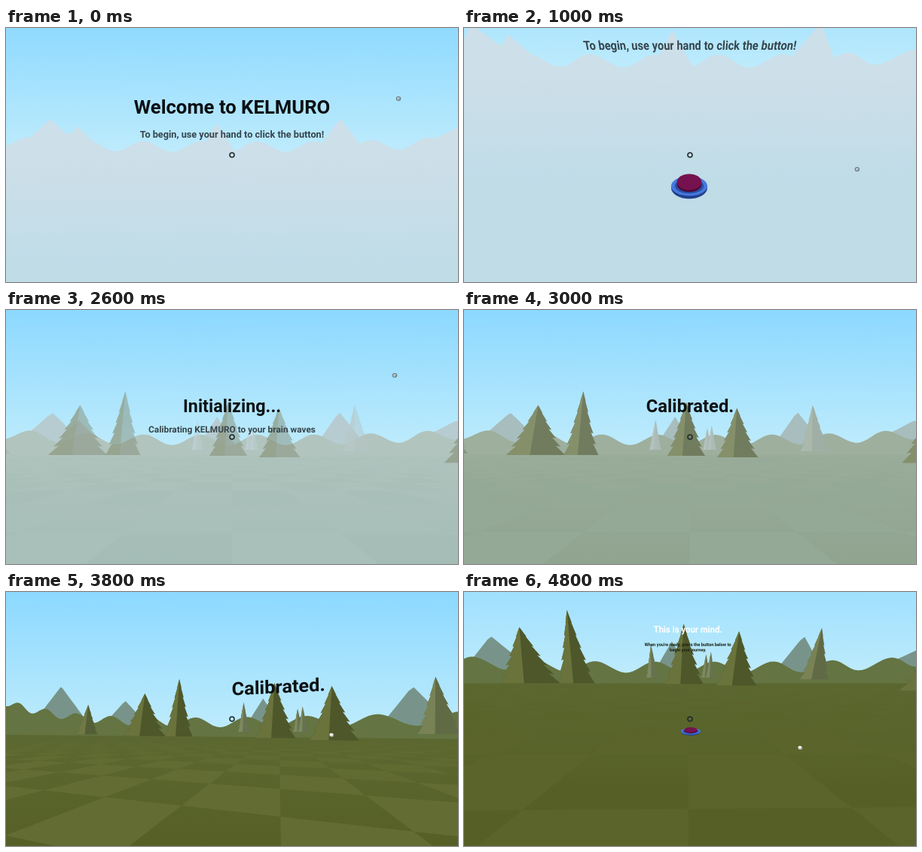
Recreate the animation shown at these times as an HTML page with a canvas. Size 600 px wide and 338 px high, loop 5 s.

```html
<!DOCTYPE html>
<html lang="en">
<head>
<meta charset="utf-8">
<style>
html, body { margin: 0; width: 100%; height: 100%; overflow: hidden; background: #cddfe9; }
canvas { display: block; width: 100vw; height: 100vh; }
</style>
</head>
<body>
<canvas id="stage" width="600" height="338"></canvas>
<script>
const ctx = document.getElementById('stage').getContext('2d');
const W = 600, H = 338, CX = 300, CY = 169, FOCAL = 245;
const LOOP = 5000, STEP = 200;

const FOG = [205, 223, 233], FLOOR_FOG = [191, 220, 231];
const FLOOR = [86, 96, 38], HILL = [100, 116, 66], MOUNTAIN = [120, 148, 138];
const LIT = [106, 115, 60], SHADE = [78, 87, 42];

// Head turns: start, end, pitch and yaw in degrees
const turns = [[0, 600, 24.4, 0], [1800, 2350, -27.9, 0], [3400, 3800, 0, 14.3],
  [3800, 4400, 0, -14.9], [4000, 4400, 16.6, 0]];

// Hand pointer: time, x, y
const handPath = [[0, 521, 94], [200, 521, 254], [400, 521, 188], [1800, 523, 188], [2000, 521, 75],
  [2600, 516, 87], [3800, 432, 190], [4400, 446, 242], [4600, 446, 207]];

// Scenery lies in pixels around the level view direction, y up
// Mountains: x, height, half width
const peaks = [[-384, 80, 80], [-241, 48, 52], [-205, 38, 38], [-20, 42, 27], [144, 49, 36], [300, 37, 75]];
// Trees: x, base, height, half width
const trees = [[-46, -2, 40, 8], [23, -2, 29, 6], [29, -2, 32, 6], [165, -4, 62, 19], [-318, -7, 51, 24],
  [-204, -9, 67, 39], [-144, -9, 86, 23], [-5, -10, 72, 25], [63, -12, 66, 27], [322, -19, 75, 42]];

// Text: start, end, words, baseline, size, colour
const lines = [
  [0, 2000, 'Welcome to KELMURO', 55, 25.7, '#0b0f13'],
  [0, 2000, 'To begin, use your hand to click the button!', 23, 12.7, '#36454e'],
  [2000, 3000, 'Initializing...', 48.4, 23.6, '#0d1114'],
  [2000, 3000, 'Calibrating KELMURO to your brain waves', 21, 11.9, '#36454b'],
  [3000, 4200, 'Calibrated.', 48.4, 24, '#0d1114'],
  [4200, 5000, 'This is your mind.', 52.3, 10.5, '#ffffff'],
  [4200, 5000, "When you're ready, press the button below to", 36.6, 5.4, '#1a2212'],
  [4200, 5000, 'begin your journey.', 30.4, 5.4, '#1a2212']];

let pitch, yaw;

const clamp = v => Math.min(1, Math.max(0, v));
const easeOut = k => 1 - (1 - k) ** 2;
const mix = (a, b, k) => a.map((v, i) => v + (b[i] - v) * k);
const rgb = c => `rgb(${c.map(Math.round)})`;

// How far the fog has lifted, 0 to 1
const clearing = t => t < 2000 ? 0 : .1 + .9 * clamp((t - 2000) / 1800) ** 1.6;

const hillTop = x => 11 - 7 * Math.cos((x + 155) / 12) + Math.abs(x / 150) ** 3;
const mountainTop = x => Math.max(0, ...peaks.map(([px, h, w]) => h * (1 - Math.abs(x - px) / w)));

function aim(t) {
  pitch = yaw = 0;
  for (const [from, to, p, y] of turns) {
    const k = easeOut(clamp((t - from) / (to - from))) * Math.PI / 180;
    pitch += p * k;
    yaw += y * k;
  }
}

function project(x, y, z = FOCAL) {
  const side = x * Math.cos(yaw) + z * Math.sin(yaw);
  const ahead = z * Math.cos(yaw) - x * Math.sin(yaw);
  const depth = ahead * Math.cos(pitch) - y * Math.sin(pitch);
  const up = y * Math.cos(pitch) + ahead * Math.sin(pitch);
  return [CX + FOCAL * side / depth, CY - FOCAL * up / depth, depth];
}

function polygon(points, fill) {
  ctx.beginPath();
  for (const [x, y] of points) ctx.lineTo(x, y);
  ctx.fillStyle = fill;
  ctx.fill();
}

function ellipse(x, y, rx, ry, fill) {
  ctx.beginPath();
  ctx.ellipse(x, y, rx, ry, 0, 0, 7);
  ctx.fillStyle = fill;
  ctx.fill();
}

function gradient(y0, y1, c0, c1) {
  const g = ctx.createLinearGradient(0, y0, 0, y1);
  g.addColorStop(0, c0);
  g.addColorStop(1, c1);
  return g;
}

function range(top, color) {
  const shape = [project(-600, -10)];
  for (let x = -600; x <= 450; x += 5) shape.push(project(x, top(x)));
  polygon([...shape, project(450, -10)], rgb(color));
}

function ground(clear, hill) {
  const horizon = project(0, 0)[1];
  const near = mix(FLOOR_FOG, FLOOR, clear), edge = mix(hill, near, .6 * clear);
  polygon([project(-600, -9), project(600, -9), [W + 400, H + 9], [-400, H + 9]],
    gradient(horizon + 8, horizon + 150, rgb(edge), rgb(near)));
  if (!clear) return;
  const contrast = 13 * clear * (1 - 2.6 * Math.max(0, pitch));
  const light = rgb(near.map(v => v + contrast));
  const wide = 1.27, deep = 1.04;
  for (let row = 0; row < 20; row++) {
    const z = .19 + row * deep;
    ctx.globalAlpha = Math.min(1, 5 / (z + 2));
    for (let col = -18; col < 18; col++) {
      if ((row + col) % 2 === 0) continue;
      const x = col * wide;
      const tile = [[x, z], [x + wide, z], [x + wide, z + deep], [x, z + deep]].map(p => project(p[0], -1, p[1]));
      if (tile.every(p => p[2] > .15)) polygon(tile, light);
    }
  }
  ctx.globalAlpha = 1;
}

function tree([x, base, height, half], clear) {
  const tiers = 6, haze = clamp((9 + base) / 7);
  const seen = clear ** (.4 + haze) * (1 - .2 * haze);
  const edge = side => {
    const points = [[x, base + height]];
    for (let i = 1; i <= tiers; i++) {
      const w = side * half * i / tiers, y = base + height * (1 - i / tiers);
      points.push([x + w, y]);
      if (i < tiers) points.push([x + w * .8, y + 1]);
    }
    return points;
  };
  const fill = (points, color) => polygon(points.map(p => project(...p)), rgb(mix(FOG, color, seen)));
  fill([...edge(-1), ...edge(1).reverse()], SHADE);
  fill([...edge(-1), [x - half * .2, base]], LIT);
}

// Every word gets its own tilt, which gives the perspective lean
function text(words, y, size, color) {
  ctx.font = `bold ${size}px Roboto, sans-serif`;
  ctx.fillStyle = color;
  ctx.textAlign = 'center';
  const gap = ctx.measureText(' ').width;
  let x = -ctx.measureText(words).width / 2;
  for (const word of words.split(' ')) {
    const w = ctx.measureText(word).width, mid = x + w / 2;
    const o = project(mid, y), r = project(mid + 1, y), d = project(mid, y - 1);
    ctx.setTransform(r[0] - o[0], r[1] - o[1], d[0] - o[0], d[1] - o[1], o[0], o[1]);
    ctx.fillText(word, 0, 0);
    x += w + gap;
  }
  ctx.resetTransform();
}

function button(x, y, rx, ry) {
  ellipse(x, y + ry * .12, rx, ry, '#23408f');
  ellipse(x, y - ry * .05, rx, ry * .9, '#4579dc');
  ellipse(x, y - ry * .05, rx * .8, ry * .68, '#2a4da6');
  ellipse(x, y - ry * .2, rx * .68, ry * .7, '#4b0a38');
  ellipse(x, y - ry * .42, rx * .68, ry * .74, '#76114f');
}

function hand(t) {
  if (t >= 3000 && t < 3600) return;
  const i = handPath.findLastIndex(p => p[0] <= t);
  const a = handPath[i], b = handPath[i + 1] || a;
  const [, x, y] = mix(a, b, (t - a[0]) / (b[0] - a[0] || 1));
  if (t < 3000) {
    ellipse(x, y, 3.2, 3, '#66757c');
    ellipse(x, y, 2.1, 1.9, '#bccdd4');
    ellipse(x + .9, y + .6, 1, .8, '#7d8c93');
  } else {
    ellipse(x + .4, y + .6, 2.8, 2.5, '#9a9c90');
    ellipse(x - .2, y - .2, 2.4, 2, '#f4f4f2');
  }
}

function draw(t) {
  aim(t);
  const clear = clearing(t), hill = mix(FOG, HILL, clear);
  const horizon = project(0, 0)[1];

  ctx.fillStyle = gradient(horizon - 190, horizon - 5, '#8ad8ff', '#bdebfc');
  ctx.fillRect(0, 0, W, H);
  range(mountainTop, mix(FOG, MOUNTAIN, clear));
  range(hillTop, hill);
  ground(clear, hill);

  ctx.globalAlpha = clamp((t - 2200) / 800);
  for (const item of trees) tree(item, clear);
  ctx.globalAlpha = 1;

  if (t >= 1000 && t < 1800) button(299, 211, 24, 14.5);
  if (t >= 4400) button(301, 185.5, 13, 4.8);
  for (const [from, to, ...line] of lines) if (t >= from && t < to) text(...line);
  hand(t);

  ctx.beginPath();
  ctx.arc(CX, CY, 3, 0, 7);
  ctx.lineWidth = 1.5;
  ctx.strokeStyle = '#1f282c';
  ctx.stroke();
}

const start = performance.now();
function tick() {
  const t = (performance.now() - start) % LOOP;
  draw(Math.floor(t / STEP) * STEP);
  requestAnimationFrame(tick);
}
tick();
</script>
</body>
</html>
```
